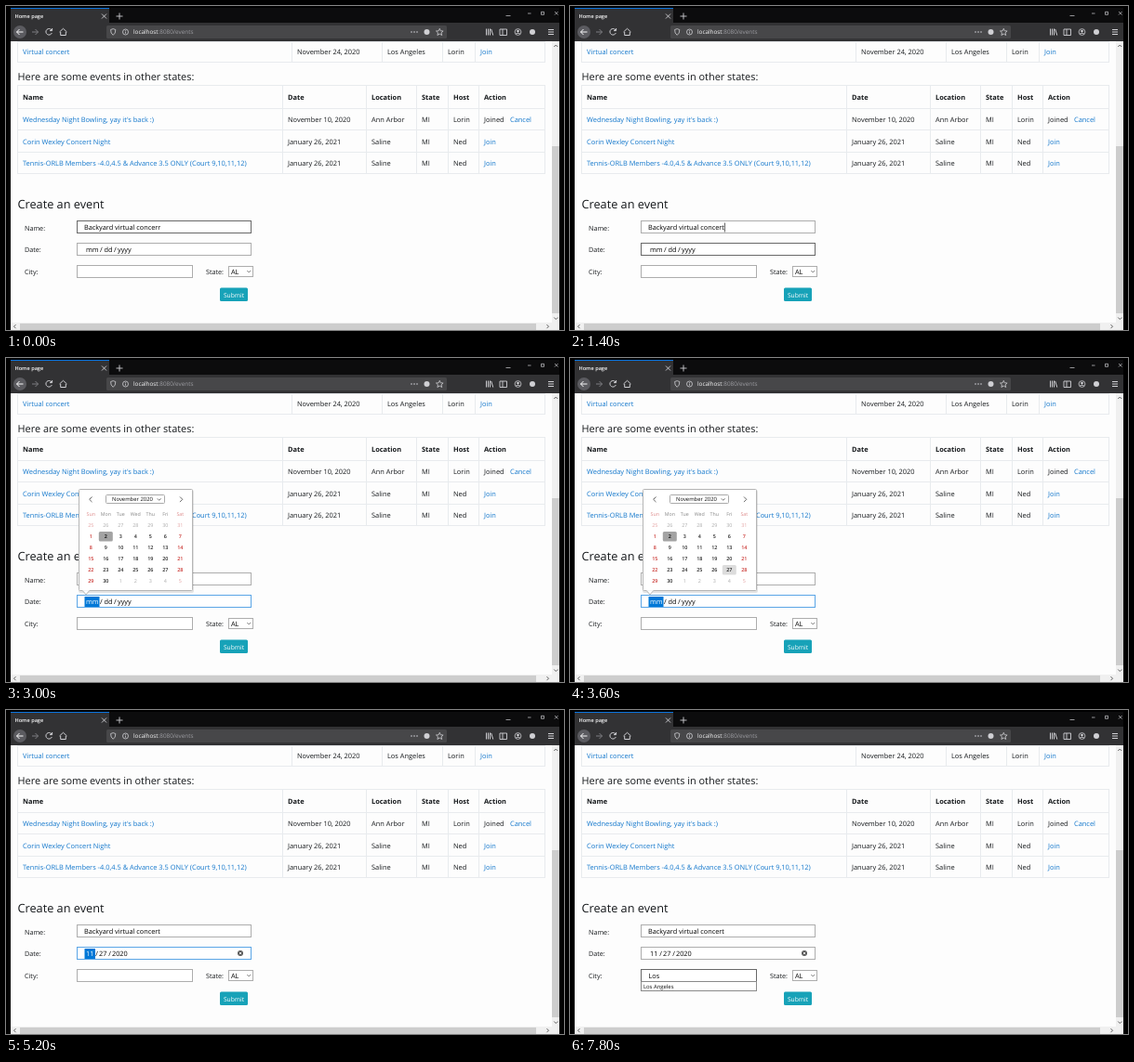
Animation, 600 px wide and 349 px high, one loop 8000 ms. Source, as an HTML page:

```html
<!DOCTYPE html>
<html lang="en">
<head>
<meta charset="utf-8">
<title>Event form</title>
<style>
html, body { margin: 0; height: 100%; overflow: hidden; background: #000; }
svg { display: block; font-family: "Open Sans", "Noto Sans", sans-serif; text-rendering: geometricPrecision; }
</style>
</head>
<body>
<svg id="stage" width="600" height="349" viewBox="0 0 600 349"><g id="page"></g><g id="form"></g></svg>
<script>
const LOOP = 8000;
const INK = '#16191c', LINK = '#1277cc', RULE = '#e8ebee', FIELD = '#adadad', DARK = '#686868', FOCUS = '#5aa5e6';
const SIZE = 7.43, INPUT = 7.3;

const rect = (x, y, w, h, fill, extra = '') =>
  `<rect x="${x}" y="${y}" width="${w}" height="${h}" fill="${fill}" ${extra}/>`;
const box = (x, y, w, h, stroke, fill = '#fff', r = 0) =>
  rect(x + .5, y + .5, w - 1, h - 1, fill, `stroke="${stroke}" rx="${r}"`);
// Text is placed by the vertical middle of its capitals.
const text = (str, x, cy, size = SIZE, fill = INK, extra = '') =>
  `<text x="${x}" y="${cy + size * .357}" font-size="${size}" fill="${fill}" ${extra}>${str}</text>`;
const line = (d, stroke, width = 1, extra = '') =>
  `<path d="${d}" fill="none" stroke="${stroke}" stroke-width="${width}" ${extra}/>`;
const disc = (x, y, r, fill, extra = '') => `<circle cx="${x}" cy="${y}" r="${r}" fill="${fill}" ${extra}/>`;
const bold = 'font-weight="700"', semibold = 'font-weight="600"', middle = 'text-anchor="middle"';

function browser() {
  const light = '#d0d0d4', dim = '#7d7d82';
  const ring = `stroke="${light}" stroke-width=".8"`;
  return rect(5, 2, 590, 17, '#0c0c0d') + rect(5, 2, 106, 17, '#323234') + rect(5, 2, 106, 1, '#0a74de') +
    text('Home page', 9.5, 10.8, 5.6, '#f9f9fa', semibold) +
    line('M103 8.5l5 5m0-5l-5 5M118.5 11h7M122 7.5v7', light, .9) +
    line('M537.5 10.5h5M561 8h3.5M590 6l3.5 3.5m0-3.5l-3.5 3.5M575.5 6.3h3v3h-3z', light, .7) +
    rect(5, 18, 590, 20, '#323234') + rect(108, 21, 366, 14, '#474749', 'rx="1.5"') +
    disc(15, 28, 7, '#5b5b60') + line('M18.5 28h-7m3-3l-3 3 3 3', '#f9f9fa') +
    line('M28 28h6.5m-3-3l3 3-3 3', dim) +
    line('M49 26a3.3 3.3 0 1 0 .3 3M49.6 24v2.6h-2.6', light) +
    line('M57.5 28l4-3.7 4 3.7M58.7 28v3.5h5.6V28', light) +
    line('M112.6 25.5l2.6-.9 2.6.9q.2 4.2-2.6 5.8-2.8-1.6-2.6-5.8z', light, .8) +
    disc(128.5, 28, 3, 'none', ring) + line('M128.5 27.5v2.2m0-3.7v.8', light, .8) +
    text(`localhost<tspan fill="#9c9ca1">:8080/events</tspan>`, 137, 28.2, 6.35, '#f9f9fa') +
    [436, 439, 442].map(x => disc(x, 28, .8, light)).join('') + disc(452.5, 28, 3, light) +
    line('M466.3 24.3l1.1 2.5 2.7.2-2 1.8.6 2.7-2.4-1.5-2.4 1.5.6-2.7-2-1.8 2.7-.2z', light, .8) +
    line('M516.5 24.5v7m2-7v7m2-7v7m1.2-6.6l2 6.6', light) +
    line('M531 25h7.5v6.5h-7.5zM534 25v6.5', light, .9) +
    disc(550.5, 28, 3.4, 'none', ring) + disc(550.5, 27, 1.3, light) + line('M548.4 30q2.1-2 4.2 0', light) +
    disc(566, 28, 3, light) + line('M583 25.5h6m-6 2.5h6m-6 2.5h6', light);
}

function scrollbars() {
  return rect(587, 38, 8, 303, '#f0f0f0') + rect(587, 151, 8, 180, '#cdcdcd') +
    rect(5, 341, 590, 8, '#f0f0f0') + rect(15, 342, 555, 7, '#cdcdcd') +
    line('M589.3 44l2-2 2 2M589.3 335.5l2 2 2-2M10.5 343.2l-2 2 2 2M581.5 343.2l2 2-2 2', '#505050', .9);
}

function cells(row, xs, cy, style) {
  return row.map((str, i) => text(str, xs[i] + 6, cy, SIZE,
    !style && (i === 0 || str === 'Join') ? LINK : INK, style)).join('');
}

function grid(xs, ys) {
  const left = xs[0], right = xs.at(-1);
  return line(xs.map(x => `M${x + .5} ${ys[0]}V${ys.at(-1)}`).join('') +
    ys.map(y => `M${left} ${y + .5}H${right + 1}`).join(''), RULE);
}

function tables() {
  const upper = [12, 307, 404, 469, 504, 579], lower = [12, 297, 387, 441, 475, 508, 579];
  const rows = [
    ["Wednesday Night Bowling, yay it's back :)", 'November 10, 2020', 'Ann Arbor', 'MI', 'Lorin', 'Joined'],
    ['Corin Wexley Concert Night', 'January 26, 2021', 'Saline', 'MI', 'Ned', 'Join'],
    ['Tennis-ORLB Members -4.0,4.5 &amp; Advance 3.5 ONLY (Court 9,10,11,12)', 'January 26, 2021', 'Saline', 'MI', 'Ned', 'Join']
  ];
  return grid(upper, [38, 60]) +
    cells(['Virtual concert', 'November 24, 2020', 'Los Angeles', 'Lorin', 'Join'], upper, 49.8) +
    text('Here are some events in other states:', 12.5, 76.3, 10.93) +
    grid(lower, [85, 110, 133, 157, 180]) +
    cells(['Name', 'Date', 'Location', 'State', 'Host', 'Action'], lower, 98.8, bold) +
    rows.map((row, i) => cells(row, lower, 122.8 + 23.4 * i)).join('') +
    text('Cancel', 542, 122.8, SIZE, LINK);
}

function labels() {
  return text('Create an event', 12.5, 213, 12.72) +
    text('Name:', 20, 239, 7.2) + text('Date:', 20, 262.5, 7.2) +
    text('City:', 20, 286.3, 7.2) + text('State:', 215, 286.3, 7.2) +
    box(239, 280, 27, 12, FIELD) + text('AL', 242, 286.3, INPUT, '#000') +
    line('M259.3 285l1.9 1.9 1.9-1.9', '#444', .7) +
    rect(230, 303.5, 30, 14.5, '#17a2b8', 'rx="1.5"') + text('Submit', 245, 311.2, 6.7, '#fff', middle);
}

function calendar(hovered) {
  let out = rect(78, 142, 124, 111, '#000', 'opacity=".1" rx="2"') +
    box(78, 141, 123, 110, '#b5b5b5', '#fff', 1) +
    `<path d="M82 250.3l4 4.5 4-4.5" fill="#fff" stroke="#b5b5b5"/>` + rect(82.5, 249, 7, 1.4, '#fff') +
    line('M92.5 149.5l-2.8 2.8 2.8 2.8M187 149.5l2.8 2.8-2.8 2.8', '#555', .9) +
    box(107, 147, 64, 10, '#aaa', '#fff', 1) + text('November 2020', 114, 152.3, 5.9, '#111') +
    line('M162.8 151.4l1.9 1.9 1.9-1.9', '#333', .7);
  const weekend = col => col % 6 === 0;
  ['Sun', 'Mon', 'Tue', 'Wed', 'Thu', 'Fri', 'Sat'].forEach((day, col) =>
    out += text(day, 91.3 + 16 * col, 168, 5.3, weekend(col) ? '#dd8a8a' : '#888', middle));
  for (let i = 0; i < 42; i++) {
    const col = i % 7, day = i - 6, inside = day > 0 && day <= 30;
    const x = 91.3 + 16 * col, y = 180.2 + 12 * Math.floor(i / 7);
    const color = weekend(col) ? (inside ? '#c9302c' : '#e3a0a0') : (inside ? '#222' : '#aaa');
    if (day === 2) out += rect(x - 7.5, y - 5.2, 15, 10.4, '#a3a3a3', 'rx="1.5"');
    if (day === hovered) out += rect(x - 7.5, y - 5.2, 15, 10.4, '#dcdcdc', 'rx="1.5"');
    const shown = day < 1 ? day + 31 : day > 30 ? day - 30 : day;
    out += text(shown, x, y, 5.4, color, `${middle} ${day === 2 ? bold : inside ? semibold : ''}`);
  }
  return out;
}

function dateField(t) {
  const focused = t >= 2200 && t < 5700, filled = t >= 4600;
  const parts = filled ? ['11', '27', '2020'] : ['mm', 'dd', 'yyyy'];
  const xs = filled ? [86, 96.3, 100, 110.3, 114] : [86, 101, 105.5, 116, 120];
  let out = box(76, 255, 188, 14, focused ? FOCUS : t >= 1300 && t < 2200 ? DARK : FIELD);
  if (focused) out += rect(84.5, 257, filled ? 11.5 : 16, 11, '#0078d7');
  [parts[0], '/', parts[1], '/', parts[2]].forEach((str, i) =>
    out += text(str, xs[i], 262.5, INPUT, i === 0 && focused ? '#fff' : '#000'));
  if (filled) out += disc(252, 262, 3, '#5a5a5a') + line('M250.8 260.8l2.4 2.4m0-2.4l-2.4 2.4', '#fff', .8);
  return out;
}

const bar = (x, y) => rect(x, y, .6, 10, '#000');
// The caret blinks every half second, counted from the last key or click.
const caret = (x, y, t, since) => Math.floor((t - since) / 500) % 2 ? '' : bar(x, y);

function form(t) {
  const name = 'Backyard virtual concer' + (t < 200 ? 'r' : t < 400 ? '' : 't');
  let out = box(76, 231, 188, 14, t < 1300 ? DARK : FIELD) + text(name, 84, 238.8, INPUT, '#000');
  if (t >= 200 && t < 2200) out += t < 400 ? caret(163.3, 233.5, t, 200) : caret(166, 233.5, t, 400);

  out += dateField(t) + box(76, 279, 125, 14, t >= 5700 ? DARK : FIELD);
  if (t >= 5700) {
    const keys = [7000, 7200, 7500].filter(k => t >= k), typed = keys.length;
    out += text('Los'.slice(0, typed), 84.5, 286.3, INPUT, '#000');
    out += typed < 3 ? caret([84, 88.4, 92.8][typed], 281, t, keys.at(-1) ?? 5700)
      : t < 7800 ? bar(97.4, 281) : '';
    if (typed) out += box(76, 292, 125, 11, '#8a8a8a') + text('Los Angeles', 79, 297.6, 5.9, '#111');
  }
  if (t >= 2800 && t < 4600) out += calendar(t < 3100 ? null : t < 3600 ? 26 : 27);
  return out;
}

const page = document.getElementById('page'), live = document.getElementById('form');
page.innerHTML = rect(5, 38, 590, 311, '#fdfdfd') + tables() + labels() + browser() + scrollbars();

let shown = '';
const start = performance.now();
function frame() {
  const markup = form((performance.now() - start) % LOOP);
  if (markup !== shown) live.innerHTML = shown = markup;
  requestAnimationFrame(frame);
}
frame();
</script>
</body>
</html>
```
